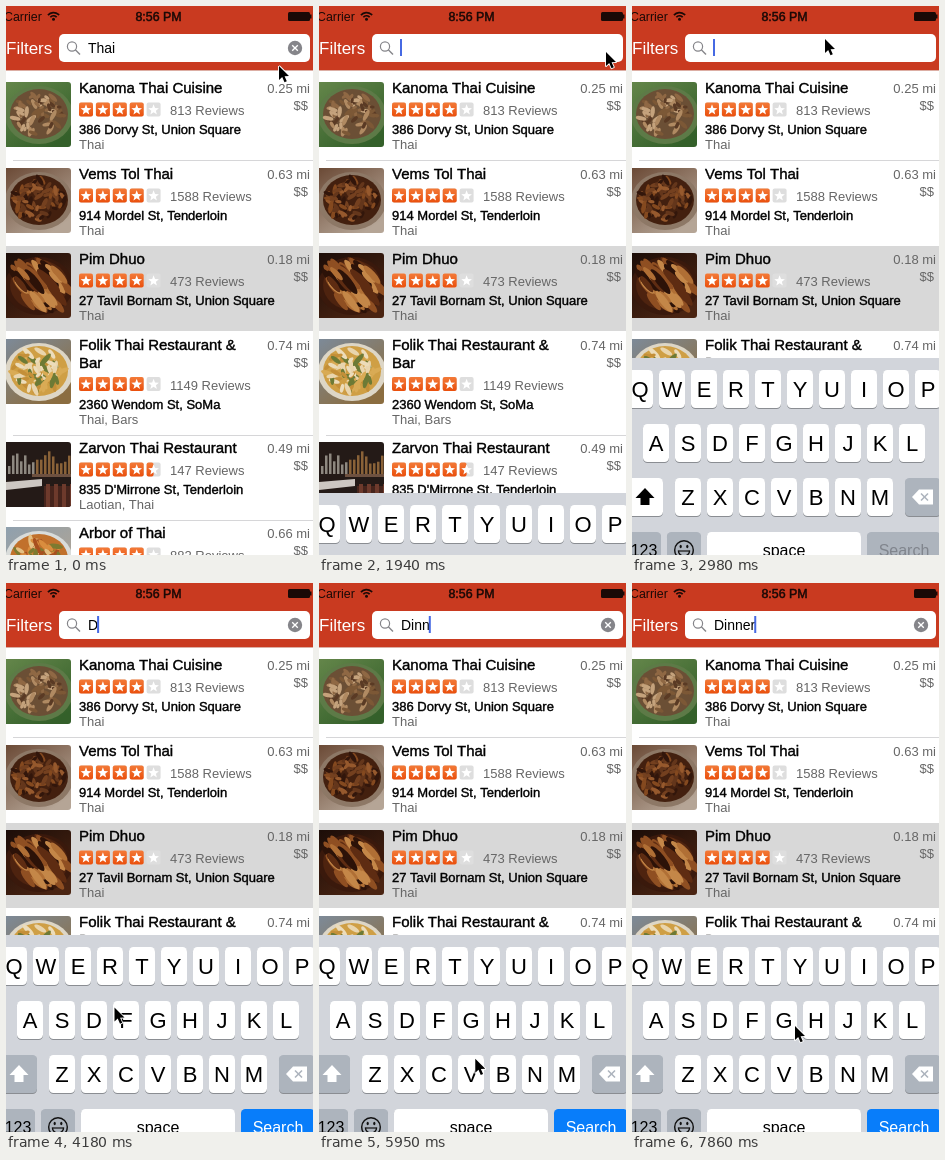
Recreate the animation shown at these times as an HTML page with a canvas. Size 307 by 549 pixels, loop 8000 ms.

```html
<!DOCTYPE html>
<html lang="en">
<head>
<meta charset="utf-8">
<title>Restaurant search</title>
<style>
  html, body { margin: 0; width: 100%; height: 100%; overflow: hidden; background: #fff; }
  canvas { display: block; width: 307px; height: 549px; }
</style>
</head>
<body>
<canvas id="stage"></canvas>
<script>
const W = 307, H = 549, LOOP = 8000, STEP = 148.3;
const INK = '#1a0906', GRAY = '#666', KEY_GRAY = '#adb4bd';
const KEY_W = 26, KEY_H = 38, PITCH = 32, ROW_PITCH = 54, KB_TOP = 352;
const FONT = '"Liberation Sans", Arial, sans-serif';
const canvas = document.getElementById('stage');
const dpr = window.devicePixelRatio || 1;
canvas.width = W * dpr;
canvas.height = H * dpr;
const c = canvas.getContext('2d');

const places = [
  { name: ['Kanoma Thai Cuisine'], stars: 4, reviews: 813, addr: '386 Dorvy St, Union Square', kind: 'Thai', mi: .25 },
  { name: ['Vems Tol Thai'], stars: 4, reviews: 1588, addr: '914 Mordel St, Tenderloin', kind: 'Thai', mi: .63 },
  { name: ['Pim Dhuo'], stars: 4, reviews: 473, addr: '27 Tavil Bornam St, Union Square', kind: 'Thai', mi: .18, picked: true },
  { name: ['Folik Thai Restaurant &', 'Bar'], stars: 4, reviews: 1149, addr: '2360 Wendom St, SoMa', kind: 'Thai, Bars', mi: .74 },
  { name: ['Zarvon Thai Restaurant'], stars: 4.5, reviews: 147, addr: "835 D'Mirrone St, Tenderloin", kind: 'Laotian, Thai', mi: .49 },
  { name: ['Arbor of Thai'], stars: 4, reviews: 882, addr: '', kind: '', mi: .66 }
];

const dishes = [
  { back: ['#64864a', '#34602a'], plate: '#5d7a47', food: '#6b4f35', bits: ['#8f6844', '#b08a62', '#5a3a24', '#7c5836', '#c4a27c'], len: 6 },
  { back: ['#6b4a36', '#b5a596'], plate: '#8d7866', food: '#43200f', bits: ['#64361b', '#84491f', '#32160b', '#74401f', '#96592d'], len: 7 },
  { back: ['#1c0d08', '#4a2412'], plate: '#3a190c', food: '#4e230f', bits: ['#8f4f22', '#2c1208', '#b06f35', '#5e2c12', '#c48748'], len: 17, turn: .75 },
  { back: ['#7d8a98', '#8b6d40'], plate: '#ddd6c6', food: '#cf9f45', bits: ['#d9ab55', '#e9d5ad', '#c48f38', '#ecdcba', '#6d7a35'], len: 8 },
  { bar: true },
  { back: ['#8fa0ae', '#b5a590'], plate: '#d9dcda', food: '#c1712c', bits: ['#d98d3e', '#7d7a30', '#a8501f', '#e5c083'], len: 8 }
];

const QUERY = 'Dinner', CLEARED = 13, presses = [27, 32, 36, 38, 47, 50];
const letterRows = [['QWERTYUIOP', -5], ['ASDFGHJKL', 11], ['ZXCVBNM', 43]];

function keyCenter(letter) {
  const r = letterRows.findIndex(([s]) => s.includes(letter));
  const [s, x] = letterRows[r];
  return [x + s.indexOf(letter) * PITCH + KEY_W / 2, KB_TOP + 12 + r * ROW_PITCH + KEY_H / 2];
}

// Pointer stops: tick, x, y. It rests on each key for one tick before the press.
const stops = [[0, 273, 60], [2, 287, 50], [8, 287, 46], [16, 287, 46], [18, 194, 33], [20, 193, 33], [43, 50, 455], [53, 163, 443]];
presses.forEach((k, i) => {
  const [x, y] = keyCenter(QUERY[i].toUpperCase());
  stops.push([k - 1, x - 2, y - 4], [k, x - 2, y - 4]);
});
stops.sort((a, b) => a[0] - b[0]);

function pointerAt(k) {
  const i = stops.findIndex(s => s[0] > k);
  if (i < 0) return stops[stops.length - 1].slice(1);
  const [t0, x0, y0] = stops[i - 1], [t1, x1, y1] = stops[i];
  const u = (k - t0) / (t1 - t0), e = u * u * (3 - 2 * u);
  return [x0 + (x1 - x0) * e, y0 + (y1 - y0) * e];
}

function random(seed) {
  return () => (seed = (seed * 16807) % 2147483647) / 2147483647;
}

function text(s, x, y, size, color, align = 'left', weight = 0) {
  c.font = size + 'px ' + FONT;
  c.textAlign = align;
  c.fillStyle = c.strokeStyle = color;
  c.fillText(s, x, y);
  if (weight) {
    c.lineWidth = weight;
    c.lineJoin = 'round';
    c.strokeText(s, x, y);
  }
}

function rect(x, y, w, h, color) {
  c.fillStyle = color;
  c.fillRect(x, y, w, h);
}

function round(x, y, w, h, r, color) {
  c.fillStyle = color;
  c.beginPath();
  c.roundRect(x, y, w, h, r);
  c.fill();
}

function oval(x, y, rx, ry, color, turn = 0) {
  c.fillStyle = color;
  c.beginPath();
  c.ellipse(x, y, rx, ry, turn, 0, 7);
  c.fill();
}

function arc(x, y, r, width, color, from = 0, to = 2 * Math.PI) {
  c.strokeStyle = color;
  c.lineWidth = width;
  c.beginPath();
  c.arc(x, y, r, from, to);
  c.stroke();
}

function path(points, color, width) {
  c.beginPath();
  points.forEach(([x, y]) => c.lineTo(x, y));
  c.fillStyle = c.strokeStyle = color;
  if (width) {
    c.lineWidth = width;
    c.stroke();
  } else c.fill();
}

function cross(x, y, r, color, width) {
  path([[x - r, y - r], [x + r, y + r]], color, width);
  path([[x + r, y - r], [x - r, y + r]], color, width);
}

function dish({ back, plate, food, bits, len, turn }, seed) {
  const r = random(seed * 97 + 11), g = c.createLinearGradient(0, 0, 45, 65);
  back.forEach((color, i) => g.addColorStop(i, color));
  rect(0, 0, 65, 65, g);
  oval(33, 33, 34, 29, plate);
  oval(33, 32, 29, 25, food);
  for (let i = 0; i < 70; i++) {
    const a = r() * 6.28, d = Math.sqrt(r());
    const size = len * (.4 + r() * .6);
    oval(33 + Math.cos(a) * d * 25, 32 + Math.sin(a) * d * 20, size, 1 + size * .2,
      bits[i % bits.length], turn === undefined ? r() * 3 : turn + r() * .2);
  }
}

function bar() {
  const r = random(5);
  rect(0, 0, 65, 65, '#241a17');
  for (let x = 2; x < 65; x += 4) {
    const h = 8 + r() * 16;
    rect(x, 32 - h, 2.5, h, x < 28 ? '#8e8880' : ['#5f4029', '#8a6238'][x / 2 % 2]);
  }
  rect(26, 32, 39, 3, '#6e5140');
  path([[0, 40], [36, 37], [36, 44], [0, 48]], '#cdc7c2');
  rect(38, 44, 27, 21, '#46241c');
  for (let x = 40; x < 65; x += 8) rect(x, 42, 4, 23, '#6d3a2c');
}

function star(x, y, fill) {
  const points = [];
  for (let i = 0; i < 10; i++) {
    const r = i % 2 ? 2.4 : 5.6, a = i * Math.PI / 5 - Math.PI / 2;
    points.push([x + 7 + Math.cos(a) * r, y + 7.4 + Math.sin(a) * r]);
  }
  round(x, y, 14, 14, 2, '#dedede');
  if (fill) {
    const g = c.createLinearGradient(0, y, 0, y + 14);
    g.addColorStop(0, '#f37a38');
    g.addColorStop(1, '#ea4f0c');
    round(x, y, 14 * fill, 14, 2, g);
  }
  path(points, '#fff');
}

function row(p, i, y, height) {
  const extra = height - 85.5;
  if (p.picked) rect(0, y - 7, W, 85, '#d8d8d8');
  else if (!places[i + 1] || !places[i + 1].picked) rect(7, y + Math.floor(height) - 7, W, 1, '#d6d6d8');
  c.save();
  c.translate(0, y);
  c.save();
  c.beginPath();
  c.roundRect(0, 0, 65, 65, [0, 3, 3, 0]);
  c.clip();
  if (dishes[i].bar) bar();
  else dish(dishes[i], i);
  c.restore();
  p.name.forEach((s, j) => text(s, 73, 11 + j * 17.5, 15, '#000', 'left', .4));
  text(p.mi + ' mi', 304, 11, 13, GRAY, 'right');
  text('$$', 302, 28, 13, GRAY, 'right');
  c.translate(0, extra);
  for (let j = 0; j < 5; j++) star(73 + j * 16.9, 20.5, Math.max(0, Math.min(1, p.stars - j)));
  text(p.reviews + ' Reviews', 164, 33, 13, GRAY);
  text(p.addr, 73, 52, 13, '#000', 'left', .4);
  text(p.kind, 73, 67, 13, GRAY);
  c.restore();
}

function list() {
  let y = 76;
  places.forEach((p, i) => {
    const height = 85.5 + (p.name.length - 1) * 17.5;
    row(p, i, Math.round(y), height);
    y += height;
  });
}

function statusBar() {
  text('Carrier', -2, 14.5, 12.4, INK);
  text('8:56 PM', 152.5, 14.5, 12.4, INK, 'center', .5);
  for (const r of [4.2, 7.4]) arc(47.5, 14, r, 1.7, INK, -Math.PI * .77, -Math.PI * .23);
  oval(47.5, 13.2, 1.5, 1.5, INK);
  round(282, 6, 22, 9, 1.5, INK);
  rect(304, 8.5, 1.5, 4, INK);
}

function header(query, caret) {
  rect(0, 0, W, 64, '#c93a20');
  rect(0, 64, W, 1, '#dcaea4');
  statusBar();
  text('Filters', 0, 48, 17, '#fff');
  round(53, 28, 251, 28, 5, '#fff');
  arc(66, 40.5, 4.6, 1.2, '#85858a');
  path([[69.3, 43.8], [74, 48.5]], '#85858a', 1.4);
  text(query, 82, 47, 14, '#000');
  if (caret) rect(81 + c.measureText(query).width, 33, 2, 17, '#4669e3');
  if (query) {
    oval(289, 42, 7.2, 7.2, '#85858a');
    cross(289, 42, 2.8, '#fff', 1.3);
  }
}

function key(x, y, w, color, label, size = 22, ink = '#000') {
  round(x, y + 1, w, KEY_H, 4.5, '#8a8d92');
  round(x, y, w, KEY_H, 4.5, color);
  if (label) text(label, x + w / 2, y + 19 + size * .36 - (size < 20 ? 1 : 0), size, ink, 'center');
}

function shiftIcon(x, y, color) {
  path([[x, y - 9], [x + 9.5, y + 1], [x - 9.5, y + 1]], color);
  rect(x - 4.5, y, 9, 8, color);
}

function deleteIcon(x, y) {
  path([[x - 11, y], [x - 4, y - 7.5], [x + 10, y - 7.5], [x + 10, y + 7.5], [x - 4, y + 7.5]], '#fff');
  cross(x + 1.5, y, 3.5, KEY_GRAY, 1.6);
}

function smiley(x, y) {
  arc(x, y, 9.3, 1.4, '#111');
  arc(x, y + .5, 5.6, 1.4, '#111', 0, Math.PI);
  path([[x - 5.6, y + 1], [x + 5.6, y + 1]], '#111', 1.2);
  for (const side of [-1, 1]) oval(x + side * 3.3, y - 3.5, 1.1, 1.7, '#111');
}

function keyboard(top, typed) {
  const rowY = r => 12 + r * ROW_PITCH;
  c.save();
  c.translate(0, top);
  rect(0, 0, W, 216, '#d2d5db');
  letterRows.forEach(([letters, x], r) => {
    [...letters].forEach((s, i) => key(x + i * PITCH, rowY(r), KEY_W, '#fff', s));
  });
  key(-5, rowY(2), 36, typed ? KEY_GRAY : '#fff');
  shiftIcon(13, rowY(2) + 19, typed ? '#fff' : '#000');
  key(273, rowY(2), 36, KEY_GRAY);
  deleteIcon(291, rowY(2) + 19);
  key(-5, rowY(3), 34, KEY_GRAY, '123', 16);
  key(35, rowY(3), 34, KEY_GRAY);
  smiley(52, rowY(3) + 18);
  key(75, rowY(3), 154, '#fff', 'space', 16);
  key(235, rowY(3), 74, typed ? '#087dfa' : KEY_GRAY, 'Search', 16, typed ? '#fff' : '#80858d');
  c.restore();
}

function arrow(x, y) {
  const shape = [[0, 0], [0, 14], [3.2, 11], [5.5, 16.2], [7.8, 15.2], [5.6, 10.2], [10, 10], [0, 0]];
  c.save();
  c.translate(x, y);
  c.lineJoin = 'round';
  path(shape, '#fff', 1.8);
  path(shape, '#000');
  c.restore();
}

function draw(t) {
  const k = Math.floor(t / STEP + .001);
  const editing = k >= CLEARED;
  const count = presses.filter(p => p <= k).length;
  const query = editing ? QUERY.slice(0, count) : 'Thai';
  const idle = k - (count ? presses[count - 1] : CLEARED);
  c.setTransform(dpr, 0, 0, dpr, 0, 0);
  rect(0, 0, W, H, '#fff');
  list();
  header(query, editing && idle % 7 < 4);
  if (editing) keyboard(KB_TOP + 135 * Math.pow(.172, k - CLEARED), count > 0);
  arrow(...pointerAt(k));
}

const start = performance.now();
function loop() {
  draw((performance.now() - start) % LOOP);
  requestAnimationFrame(loop);
}
loop();
</script>
</body>
</html>
```
